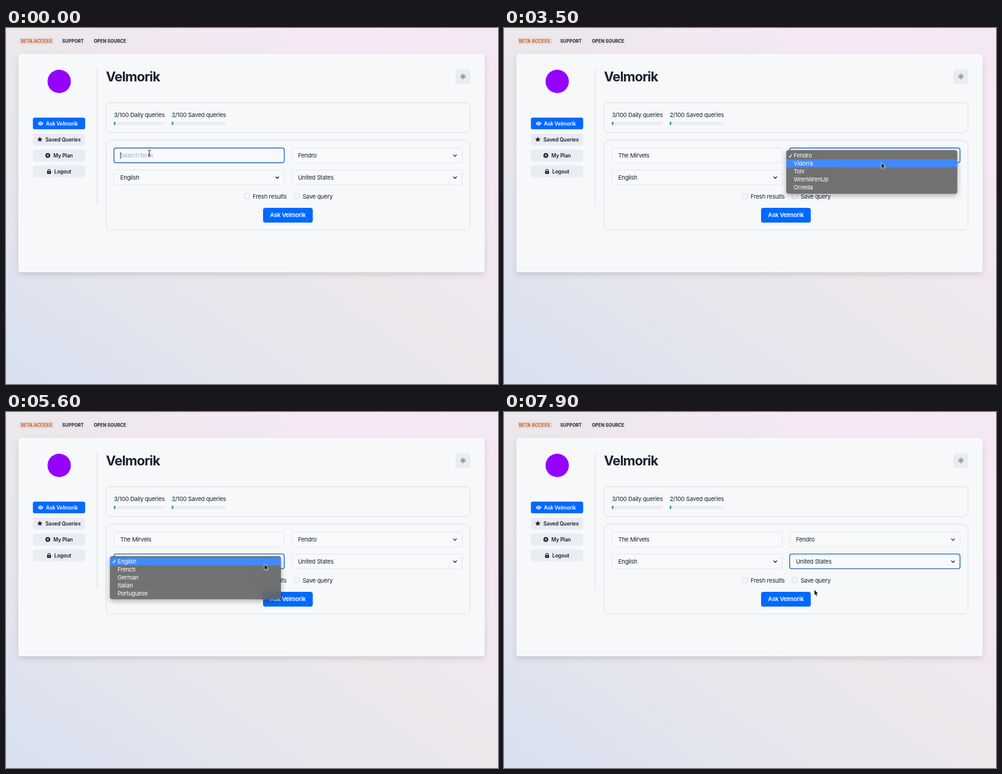
Recreate the animation shown at these times as an HTML page. Size 800 by 580 pixels, loop 8000 ms.

```html
<!DOCTYPE html>
<html lang="en">
<head>
<meta charset="utf-8">
<title>Velmorik</title>
<style>
  html, body { margin: 0; width: 100%; height: 100%; overflow: hidden; }
  body {
    position: relative;
    background: linear-gradient(to top right, #d7e0f0, #e8e6ec 35%, #ece8ec 52%, #f6e7f5 82%, #f4e8f3);
    font: 400 9.6px Inter, "Liberation Sans", sans-serif;
    letter-spacing: -.024em;
  }
  svg { position: absolute; left: 0; top: 0; }
  text { fill: #1a202c; white-space: pre; }
  .title { font-size: 21.6px; font-weight: 700; letter-spacing: -.035em; }
  .side { font-size: 8.4px; font-weight: 600; letter-spacing: -.013em; }
  .tag { font-size: 7.2px; font-weight: 700; letter-spacing: .01em; }
  .bold { font-weight: 600; text-anchor: middle; }
  .white { fill: #fff; }
  .beta { fill: #e0532b; }
  .hint { fill: #a0aec0; }
  .panel { fill: none; stroke: #d9dfe8; }
  .field { fill: #f7f9fb; stroke: #e2e7ee; }
  .box { fill: none; stroke: #d6dce6; }
  .focus { fill: none; stroke: #2a6ac8; stroke-width: 1.4; opacity: 0; }
  .line { fill: none; stroke: #1a202c; }
  #card { filter: drop-shadow(0 4px 4px rgba(0, 0, 0, .12)); }
  .menu {
    position: absolute; width: 278px; padding: 2.2px 0 3.5px; border-radius: 4px;
    background: rgba(95, 95, 95, .87); backdrop-filter: blur(10px);
    box-shadow: 0 3px 9px rgba(0, 0, 0, .3), 0 0 1px rgba(0, 0, 0, .4);
    color: #fff; font-size: 9.4px; line-height: 13px; overflow: hidden;
  }
  .menu div { height: 13px; padding-left: 12.5px; }
  .menu .hot { background: #438af9; }
  .menu svg { left: 4px; top: 5.5px; }
</style>
</head>
<body>
<svg id="page" width="800" height="580"></svg>
<svg id="pointer" width="800" height="580" style="z-index:9">
  <path id="arrow" d="M0 0V9.6L2.2 7.6L3.7 11L5.4 10.3L3.9 7H6.8Z" fill="#111" stroke="#fff" stroke-width=".7"/>
  <path id="beam" d="M-2 -5Q0 -5 0 -3.6Q0 -5 2 -5M0 -3.6V3.6M-2 5Q0 5 0 3.6Q0 5 2 5M-1 1.5H1" fill="none" stroke="#222"/>
</svg>
<script>
const LOOP = 8000, BRAND = 'Velmorik', QUERY = 'The Mirvels';
const DARK = '#1a202c', GREY = '#e9edf3', BLUE = '#0069ff';
const $ = id => document.getElementById(id);

const rect = (x, y, w, h, r, attrs) => `<rect x="${x}" y="${y}" width="${w}" height="${h}" rx="${r}" ${attrs}/>`;
const fill = c => `fill="${c}"`;
const cls = c => `class="${c}"`;
const text = (x, y, s, c = '', id = '') => `<text x="${x}" y="${y}" class="${c}" id="${id}">${s}</text>`;
const at = (x, y, body) => `<g transform="translate(${x} ${y})">${body}</g>`;

const polar = (r, a) => `${r * Math.sin(a)},${-r * Math.cos(a)}`;
const star = Array.from({ length: 10 }, (_, i) => polar(i % 2 ? 2 : 4.8, i * Math.PI / 5)).join(' ');
const rays = Array.from({ length: 8 }, (_, i) => `M${polar(3.1, i * Math.PI / 4)}L${polar(4.4, i * Math.PI / 4)}`).join('');
const icons = {
  eye: `<path d="M-4.5 0Q0 -6.4 4.5 0Q0 6.4 -4.5 0Z" fill="#fff"/><circle r="2" ${fill(BLUE)}/><circle r="1.2" fill="#fff"/>`,
  star: `<polygon points="${star}" ${fill(DARK)}/>`,
  gear: `<circle r="2.4" class="line" stroke-width="2"/><circle r="3.6" class="line" stroke-width="1.4" stroke-dasharray="1.414"/>`,
  lock: rect(-3.2, -.6, 6.4, 4.6, .7, fill(DARK)) +
    `<path d="M-1.9 0V-1.6A1.9 1.9 0 0 1 1.9 -1.6V0" class="line" stroke-width="1.1"/><circle cy="1.6" r=".8" fill="#fff"/>`,
  sun: `<circle r="1.9" class="line" stroke-width=".9"/><path d="${rays}" class="line" stroke-width=".9"/>`
};

const tag = (x, w, s, c = '', bg = '#e6e4e8') => rect(x, 16, w, 10.5, 1.2, fill(bg)) + text(x + 2.3, 23.9, s, 'tag ' + c);
const sideButton = (y, icon, ix, x, s, on) => rect(43.7, y, 85, 19, 3.2, fill(on ? BLUE : GREY)) +
  at(ix, y + 9.7, icons[icon]) + text(x, y + 12.6, s, 'side' + (on ? ' white' : ''));
const meter = (x, w, s) => text(x, 145, s) + rect(x, 153, w, 4.8, 0, fill(GREY)) + rect(x, 153, 2.6, 4.8, 0, fill('#38a169'));
const field = (x, y, s, id) => rect(x, y, 277, 24, 3.4, cls('field')) + rect(x, y, 277, 24, 3.4, cls('focus')) +
  text(x + 10.2, y + 15.6, s, '', id) +
  (id ? '' : at(x + 265.6, y + 12.2, '<path d="M-2.7 -1.3L0 1.4L2.7 -1.3" class="line" stroke-width="1.3"/>'));
const check = (x, s) => rect(x, 269.5, 8.5, 8.5, 1.2, cls('box')) + text(x + 13.6, 277.5, s);

$('page').innerHTML =
  tag(22, 56, 'BETA ACCESS', 'beta', '#dfddd8') + tag(89.3, 40, 'SUPPORT') + tag(140.6, 57.5, 'OPEN SOURCE') +
  rect(20, 42, 758.5, 356, 5, 'id="card" ' + fill('#f6f8fa')) +
  `<circle cx="86.5" cy="87" r="19" fill="#9600ff"/>` +
  sideButton(146, 'eye', 56.3, 65, 'Ask ' + BRAND, true) +
  sideButton(172, 'star', 55, 64, 'Saved Queries') +
  sideButton(198, 'gear', 68, 77, 'My Plan') +
  sideButton(224, 'lock', 70, 78.5, 'Logout') +
  rect(147.6, 66, 1, 222, 0, fill('#d9dee6')) +
  text(162.5, 87, BRAND, 'title') +
  rect(731, 67, 24, 24, 3.6, fill(GREY)) + at(743, 79, icons.sun) +
  rect(162.8, 121.7, 591.7, 48.6, 7, cls('panel')) +
  meter(175.4, 82.4, '3/100 Daily queries') + meter(269.4, 88, '2/100 Saved queries') +
  rect(162.8, 183, 591.7, 146, 7, cls('panel')) +
  field(175.5, 195.5, '', 'query') + text(185.7, 211.1, 'Search term', 'hint', 'hint') +
  rect(0, 202, .9, 11, 0, 'id="caret" ' + fill(DARK)) +
  field(464.5, 195.5, 'Fendro') + field(175.5, 231.4, 'English') + field(464.5, 231.4, 'United States') +
  check(387.5, 'Fresh results') + check(468.6, 'Save query') +
  rect(418, 293, 80.8, 24, 3.6, fill(BLUE)) + text(458.4, 308.4, 'Ask ' + BRAND, 'bold white');

// Each menu opens at once and fades out after it closes.
const menus = [
  [458.5, 199, 2450, 4250, 'Fendro,Vidorra,Tolv,WrenWrenUp,Orveda'],
  [169, 234.5, 4900, 6140, 'English,French,German,Italian,Portuguese'],
  [458.5, 234.5, 6550, 7250, 'United States,United Kingdom,France,Germany,Italy,Portugal']
].map(([x, y, open, close, items]) => {
  const el = document.createElement('div');
  el.className = 'menu';
  el.style.cssText = `left:${x}px;top:${y}px`;
  el.innerHTML = items.split(',').map(s => `<div>${s}</div>`).join('') +
    '<svg width="6" height="7"><path d="M.6 3.8L2 5.6L4.8 .9" fill="none" stroke="#fff" stroke-width="1.1"/></svg>';
  document.body.append(el);
  return { el, x, y, open, close, rows: [...el.querySelectorAll('div')] };
});

const rings = [...document.querySelectorAll('.focus')];
const focusAt = [-1000, 2450, 4900, 6550, LOOP + 1000];

// time, x, y of the pointer
const path = [
  [0, 233, 204], [1300, 233, 204], [1600, 326.5, 182], [2300, 600, 207], [3000, 605, 208],
  [3500, 613.5, 219.5], [3800, 615, 246], [4200, 613, 207], [4850, 421, 246], [5000, 421.5, 247.5],
  [5600, 420, 248], [6200, 630.5, 239], [6800, 629.5, 245.5], [7300, 629.5, 246], [7900, 504.5, 289.3], [8000, 504.5, 289.3]
];
const clamp = v => Math.max(0, Math.min(1, v));
const show = (el, on) => { el.style.visibility = on ? 'visible' : 'hidden'; };

function pointerAt(t) {
  const i = path.findIndex(p => p[0] > t);
  const [t0, x0, y0] = path[i - 1], [t1, x1, y1] = path[i];
  const u = (t - t0) / (t1 - t0), k = u * u * (3 - 2 * u);
  return [x0 + (x1 - x0) * k, y0 + (y1 - y0) * k];
}

function draw(t) {
  const [x, y] = pointerAt(t);
  const typing = t > 350 && t < 1300;
  const inInput = x > 175 && x < 453 && y > 195 && y < 220;
  for (const id of ['arrow', 'beam']) {
    $(id).setAttribute('transform', `translate(${x} ${y})`);
    show($(id), !typing && inInput === (id === 'beam'));
  }

  const typed = QUERY.slice(0, Math.max(0, Math.floor((t - 310) / 80)));
  $('query').textContent = typed;
  show($('hint'), !typed);
  $('caret').setAttribute('x', 185.7 + (typed ? $('query').getComputedTextLength() : 0));
  show($('caret'), t < 2450 && (t < 1300 || (t - 1300) % 1000 < 500));

  rings.forEach((ring, i) => {
    ring.style.opacity = clamp((t - focusAt[i]) / 200) * clamp(1 - (t - focusAt[i + 1]) / 200);
  });

  for (const m of menus) {
    const alpha = t < m.open ? 0 : clamp(1 - (t - m.close) / 250);
    m.el.style.opacity = alpha;
    show(m.el, alpha > 0);
    const inside = x > m.x && x < m.x + 278;
    const hot = inside ? Math.floor((y - m.y - 2.2) / 13) : -1;
    m.rows.forEach((row, i) => row.classList.toggle('hot', i === hot));
  }
}

function tick() {
  draw(performance.now() % LOOP);
  requestAnimationFrame(tick);
}
tick();
</script>
</body>
</html>
```
